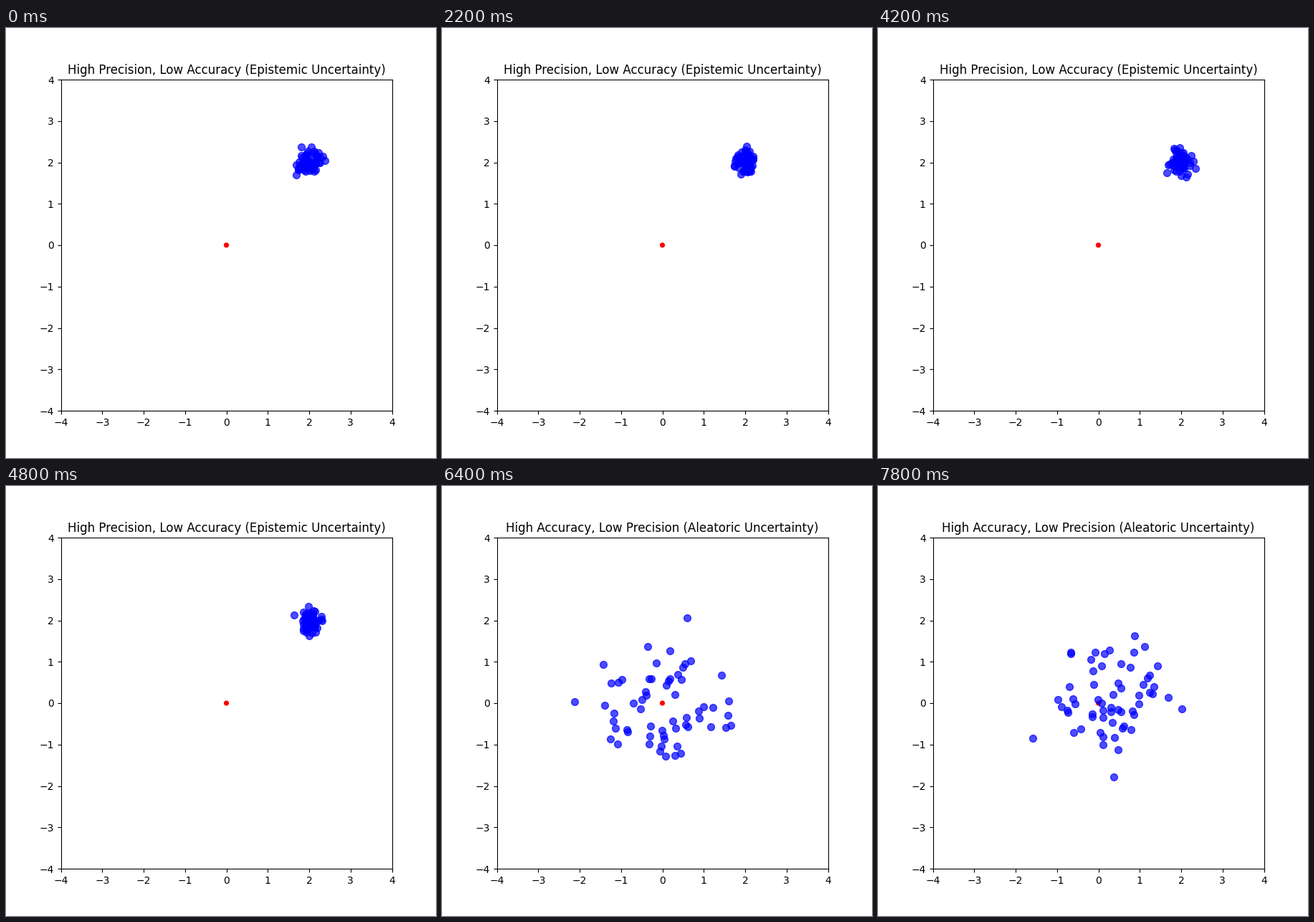
These frames come from a looping animation (600x600 px, 8 s). A matplotlib script:

```python
import numpy as np
import matplotlib.pyplot as plt
from matplotlib.animation import FuncAnimation
from matplotlib.patches import Circle

FRAMES, INTERVAL = 40, 200
SWITCH = 25          # first step of the second phase
N_DOTS = 60
TAIL = 0.99          # share of the bell curve kept, trims far strays

# title, cloud centre, spread
PRECISE = ("High Precision, Low Accuracy (Epistemic Uncertainty)", 2, 0.15)
ACCURATE = ("High Accuracy, Low Precision (Aleatoric Uncertainty)", 0, 0.8)


def cloud(step, centre, sigma):
    """Fresh round Gaussian cloud for every step."""
    rng = np.random.default_rng(100 + step)
    angle = rng.uniform(0, 2 * np.pi, N_DOTS)
    radius = sigma * np.sqrt(-2 * np.log(1 - TAIL * rng.random(N_DOTS)))
    return centre + np.column_stack([radius * np.cos(angle),
                                     radius * np.sin(angle)])


fig, ax = plt.subplots(figsize=(6, 6), dpi=100)
ax.set_xlim(-4, 4)
ax.set_ylim(-4, 4)
ax.set_aspect("equal")
title = ax.set_title("")
ax.add_patch(Circle((0, 0), 0.05, color="red"))
dots = ax.scatter([], [], s=50, color="blue", alpha=0.7, zorder=2)


def draw(step):
    text, centre, sigma = PRECISE if step < SWITCH else ACCURATE
    title.set_text(text)
    dots.set_offsets(cloud(step, centre, sigma))
    return dots, title


anim = FuncAnimation(fig, draw, frames=FRAMES, interval=INTERVAL,
                     init_func=lambda: draw(0), repeat=True, repeat_delay=0,
                     blit=False)
plt.show()
```
